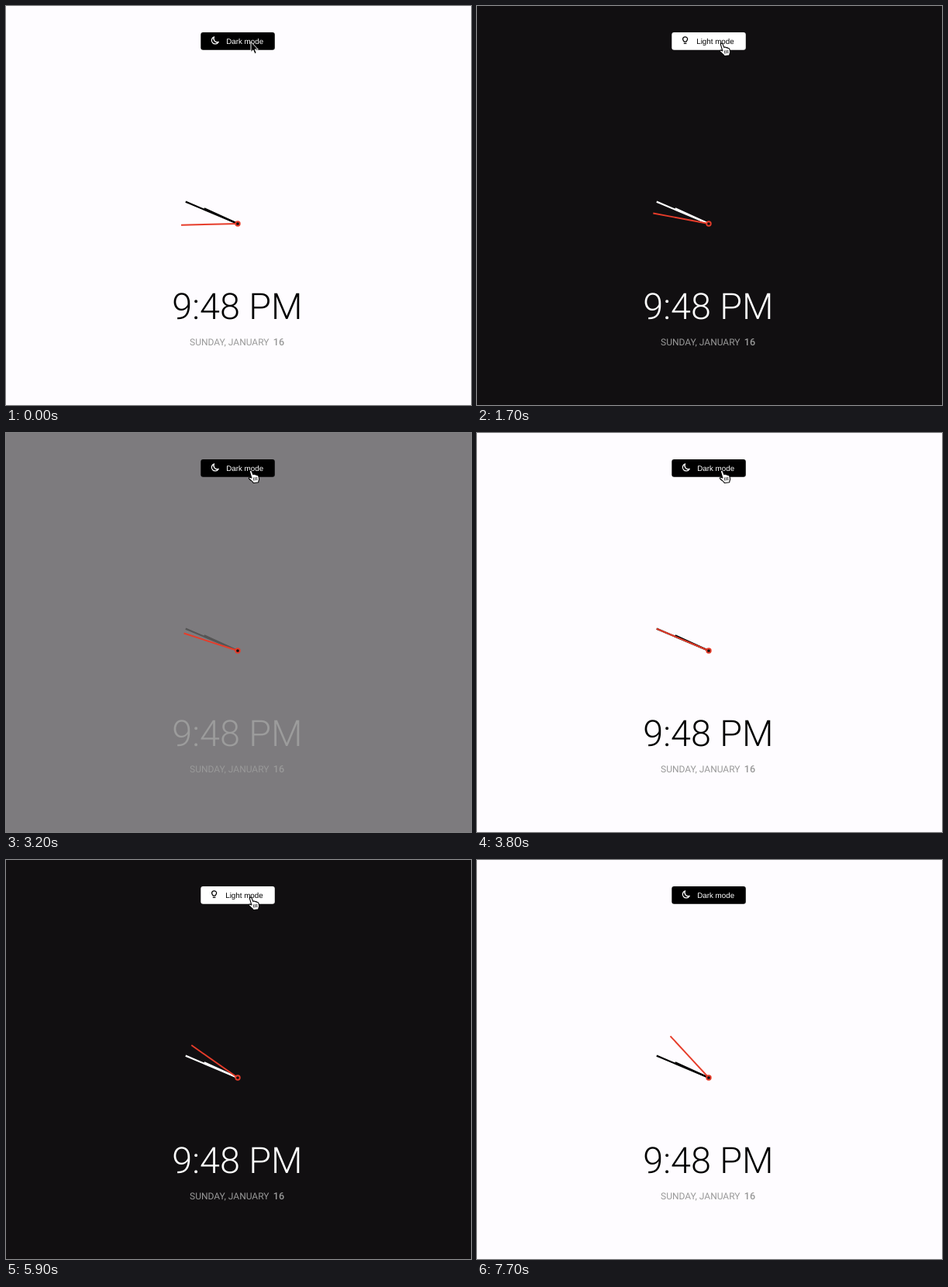
These frames come from a looping animation (600x515 px, 8000 ms). An HTML page:

```html
<!DOCTYPE html>
<html lang="en">
<head>
<meta charset="utf-8">
<title>Theme clock</title>
<style>
  html, body { margin: 0; width: 100%; height: 100%; overflow: hidden; }
  svg { display: block; width: 600px; height: 515px; }
  .label { font: 9.8px "Liberation Sans", Arial, sans-serif; text-rendering: geometricPrecision; }
  .time { font: 300 46.8px Roboto, sans-serif; text-rendering: geometricPrecision; }
  .date { font: 400 12px Roboto, sans-serif; fill: #999; text-rendering: geometricPrecision; }
  .day { font-weight: 500; font-size: 12.6px; }
  .icon { fill: none; stroke-width: 1.25; stroke-linejoin: round; stroke-linecap: round; }
</style>
</head>
<body>
<svg viewBox="0 0 600 515">
  <rect id="bg" width="600" height="515"/>

  <rect id="button" x="251.3" y="34" width="95.5" height="22.8" rx="3"/>
  <g id="darkLabel" fill="#fff">
    <path class="icon" stroke="#fff" d="M268.6 39.8A4.7 4.7 0 1 0 274.2 46.4A4.6 4.6 0 0 1 268.6 39.8Z"/>
    <text class="label" x="284.2" y="48.5">Dark mode</text>
  </g>
  <g id="lightLabel" fill="#000">
    <path class="icon" stroke="#000" d="M267.2 46.2c-.2-1.2-1.6-1.7-1.6-3.4a3 3 0 0 1 6 0c0 1.7-1.4 2.2-1.6 3.4zM267.3 48.3h2.6"/>
    <text class="label" x="283.2" y="48.5">Light mode</text>
  </g>

  <g transform="translate(299 281)">
    <g id="hands">
      <rect id="hour" x="-1.1" y="-47.5" width="2.2" height="47.5"/>
      <rect id="minute" x="-1.1" y="-73" width="2.2" height="73"/>
    </g>
    <rect id="second" x="-.95" y="-73" width="1.9" height="73" fill="#e63c2a"/>
    <circle r="3.7" fill="#e63c2a"/>
    <circle r="1.85" fill="#110f11"/>
  </g>

  <text id="time" class="time" x="214.2" y="404">9:48 PM</text>
  <text class="date" x="237" y="438">SUNDAY, JANUARY</text>
  <text class="date day" x="344.8" y="438">16</text>

  <path id="arrow" d="M316 46.3v13.2l2.9-2.7 2 4.8 2.3-1-2-4.6h4.1z" fill="#000" stroke="#fff"/>
  <g id="pointer" transform="translate(311.4 48.1) scale(1.15) translate(-311.8 -48.9)" stroke="#000" stroke-width=".95" stroke-linejoin="round" stroke-linecap="round">
    <path fill="#fff" d="M314.2 49.6c.8-1.2 2.2-.6 2.6.4l1.5 3.6c1-.7 2-.3 2.2.3.9-.4 1.7 0 2 .6 1-.3 1.7.2 1.9 1.2l.6 2.6c.2 1-.2 1.8-.5 2.6l-.3 1.6-5.6.6-.8-1.3c-1.2-1-2.6-2-3.8-3.2-1-.9-.3-2.2 1-1.8l1.5.7z"/>
    <path fill="none" stroke-width=".7" d="M318.6 57.3l.6 3M320.5 57l.5 3M322.3 56.8l.4 3"/>
  </g>
</svg>
<script>
const LOOP = 8000, STEP = 100;
const TICK = 800, TICK_LEAD = 100, FIRST_SECOND = 44;
const FADE = 900;
const TOGGLES = [500, 2640, 4975, 6750];
const POINTER_ON = 100, POINTER_OFF = 7400;

const LIGHT = { bg: [254, 252, 255], ink: [0, 0, 0] };
const DARK = { bg: [17, 15, 17], ink: [255, 255, 255] };

const el = id => document.getElementById(id);
const clamp = p => Math.min(1, Math.max(0, p));
const show = (id, on) => el(id).setAttribute('visibility', on ? 'visible' : 'hidden');
const fill = (id, color) => el(id).setAttribute('fill', color);
const turn = (id, deg) => el(id).setAttribute('transform', `rotate(${deg})`);
const mix = (a, b, p) => `rgb(${a.map((v, i) => Math.round(v + (b[i] - v) * p))})`;

// CSS ease-in: cubic-bezier(.42, 0, 1, 1)
function easeIn(x) {
  if (x >= 1) return 1;
  let lo = 0, hi = 1, s = 0.5;
  for (let i = 0; i < 24; i++) {
    s = (lo + hi) / 2;
    const r = 1 - s;
    if (1.26 * r * r * s + 3 * r * s * s + s * s * s < x) lo = s; else hi = s;
  }
  return s * s * (3 - 2 * s);
}

// The dial maps 0..59 onto a full turn.
const dial = n => n / 59 * 360;

function secondAngle(t) {
  const u = t + TICK_LEAD;
  const n = Math.floor(u / 1000);
  return dial(FIRST_SECOND + n + easeIn((u - n * 1000) / TICK));
}

function draw(t) {
  const count = TOGGLES.filter(at => at <= t).length;
  const dark = count % 2 === 1;
  const age = count ? t - TOGGLES[count - 1] : LOOP;
  const from = dark ? LIGHT : DARK, to = dark ? DARK : LIGHT;
  const p = clamp(age / FADE);

  fill('bg', mix(from.bg, to.bg, easeIn(p)));
  fill('time', mix(from.ink, to.ink, p * p));
  fill('hands', mix(from.ink, to.ink, p ** 0.85));
  fill('button', dark ? '#fff' : '#000');
  show('darkLabel', !dark);
  show('lightLabel', dark);

  turn('second', secondAngle(t));
  show('arrow', t < POINTER_ON);
  show('pointer', t >= POINTER_ON && t < POINTER_OFF);
}

turn('hour', 9 / 11 * 360);
turn('minute', dial(48));

const start = performance.now();
function frame() {
  const t = (performance.now() - start) % LOOP;
  draw(Math.floor(t / STEP) * STEP);
  requestAnimationFrame(frame);
}
frame();
</script>
</body>
</html>
```
